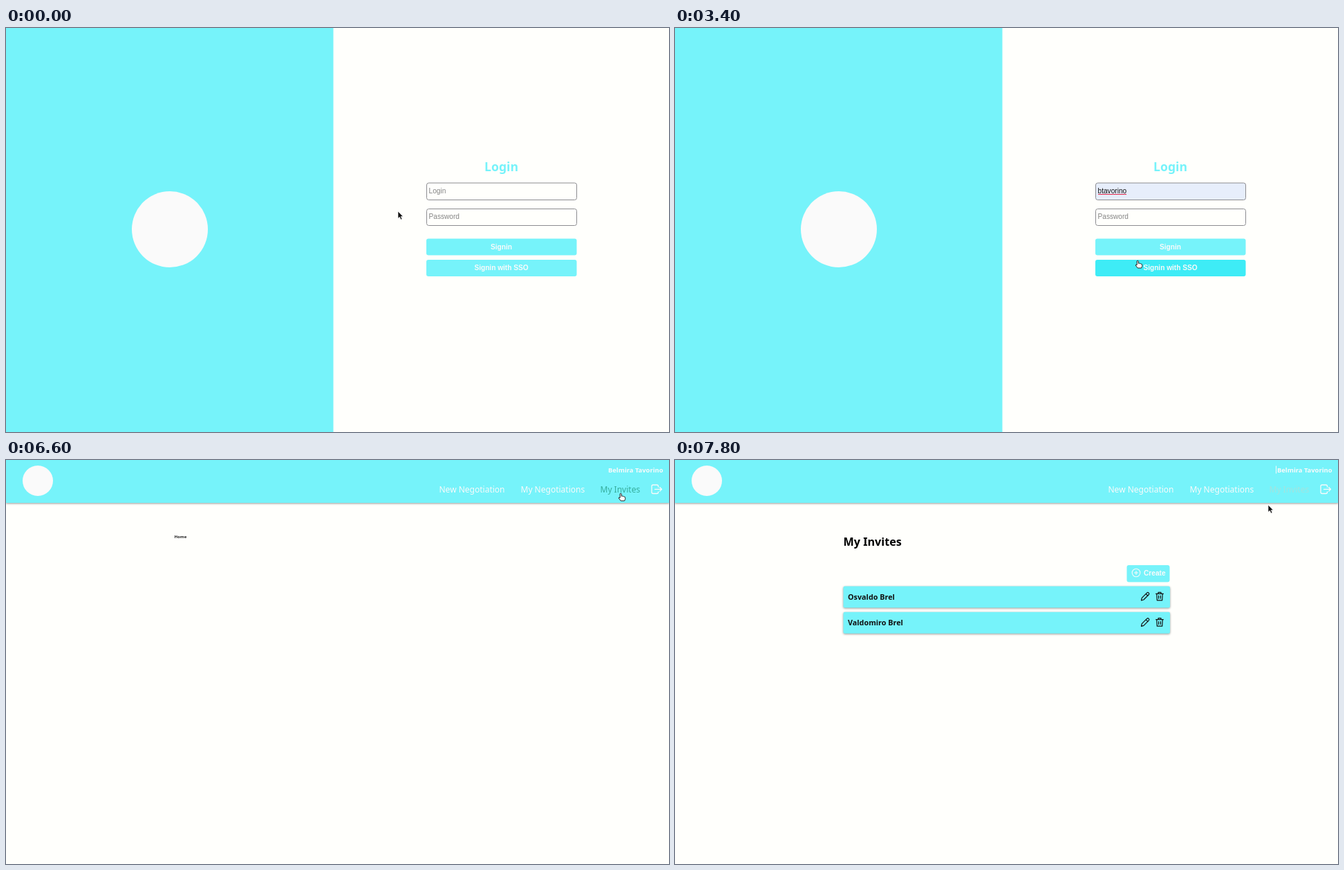
Write an HTML page that moves like this. It is 959 by 584 pixels and loops after 8000 ms.

```html
<!DOCTYPE html>
<html lang="en">
<head>
<meta charset="utf-8">
<title>Login and invites</title>
<style>
  html, body { margin: 0; width: 100%; height: 100%; overflow: hidden; background: #fffffc; }
  svg { display: block; width: 959px; height: 584px; font-family: "Noto Sans", "Open Sans", sans-serif; }
  .cyan { fill: #76f3fa; }
  .pale { fill: #fafafa; }
  .bold { font-weight: 700; }
  .ui { font: 10.13px "Liberation Sans", Arial, sans-serif; }
  .btn { font-weight: 700; fill: #fafafa; }
  .mid { text-anchor: middle; }
  .hint { fill: #858585; }
  .field { fill: #fffffc; stroke: #8c8c90; }
  .line { fill: none; stroke-linecap: round; stroke-linejoin: round; }
  .shade { filter: drop-shadow(0 1px 1.5px rgba(0, 0, 0, .4)); }
  .nav { font-size: 12px; fill: #fafafa; }
  .menu { font-size: 9.8px; font-weight: 600; fill: #222; }
</style>
</head>
<body>
<svg viewBox="0 0 959 584">
  <defs>
    <g id="pencil" class="line" stroke="#111" stroke-width="1.2">
      <path d="M-5.5 5.5l.8-3.6L2.8-5.6q1.2-1 2.4.2t.2 2.4l-7.5 7.5zM1.2-4l2.8 2.8"/>
    </g>
    <g id="trash" class="line" stroke="#111" stroke-width="1.2">
      <path d="M-5.3-3.6H5.3M-2-3.8V-5.6H2v1.8M-4.2-3.4l.5 9.2H3.7l.5-9.2M-1.4-.8v4M1.4-.8v4"/>
    </g>
  </defs>

  <g id="login">
    <rect class="cyan" width="473.5" height="584"/>
    <circle class="pale" cx="237" cy="291" r="55"/>
    <text class="bold cyan mid" x="716.5" y="207" font-size="17.6">Login</text>
    <rect id="user" class="field" x="608.5" y="224" width="217" height="24.5" rx="3"/>
    <text id="userText" class="ui" x="611.5" y="239"></text>
    <path id="spell" d="M612 240.5H653" stroke="#e0284a"/>
    <rect id="caret" y="230" width="1" height="11"/>
    <rect class="field" x="608.5" y="261.5" width="217" height="24" rx="3"/>
    <text class="ui hint" x="611.5" y="276">Password</text>
    <rect id="signin" x="608" y="304.5" width="217.5" height="24" rx="3"/>
    <text class="ui btn mid" x="716.5" y="319.5">Signin</text>
    <rect id="sso" x="608" y="335" width="217.5" height="24" rx="3"/>
    <text class="ui btn mid" x="716.5" y="350">Signin with SSO</text>
    <g id="list">
      <rect class="shade" x="607.5" y="249.5" width="218" height="143.5" rx="2" fill="#fffffc"/>
      <rect id="pick" x="607.5" y="254" width="218" height="22.5" fill="#e5e5e3"/>
      <g id="names" class="menu"></g>
    </g>
  </g>

  <g id="app">
    <rect class="cyan shade" width="959" height="62"/>
    <circle class="pale" cx="46" cy="30" r="22"/>
    <text class="bold pale" x="950.5" y="17.5" font-size="9.4" text-anchor="end">Belmira Tavorino</text>
    <rect id="nameCaret" class="pale" x="869" y="8.5" width="1" height="11"/>
    <g class="nav">
      <text x="626.5" y="47">New Negotiation</text>
      <text x="744.5" y="47">My Negotiations</text>
      <text id="link" x="859.5" y="47">My Invites</text>
    </g>
    <path class="line" stroke="#fafafa" stroke-width="1.3"
      d="M943.5 39V38q0-2-2-2H936q-2 0-2 2v8.500q0 2 2 2h5.500q2 0 2-2V46M938.500 42.300H948.500M945.700 39.500l2.800 2.800l-2.800 2.800"/>
    <text id="home" x="243.500" y="113" font-size="6" font-weight="600" fill="#222">Home</text>
    <g id="status">
      <path d="M0 571H315.500q2.500 0 2.500 2.500V584H0z"/>
      <text x="2" y="581" font-size="9.1" fill="#f4f4f4">Waiting for zunelo-vercel.vercel.app…</text>
    </g>
    <g id="invites">
      <text class="bold" x="243.500" y="124" font-size="16.2">My Invites</text>
      <rect class="cyan" x="653.500" y="152" width="62" height="24.500" rx="3"/>
      <path class="line" stroke="#fafafa" stroke-width="1.100"
        d="M661.200 163a5.800 5.800 0 1 1 11.600 0a5.800 5.800 0 1 1-11.600 0M664.500 163h5M667 160.500v5"/>
      <text class="ui btn" x="678" y="167">Create</text>
    </g>
    <g id="rows"></g>
  </g>

  <g id="busy">
    <rect width="959" height="584" opacity=".31"/>
    <g id="spin">
      <path d="M12 2.600A12.300 12.300 0 1 1 7-10.100" fill="none" stroke="#76f3fa" stroke-width="4.800"/>
      <path class="cyan" d="M10-15V-7H2.500z"/>
    </g>
  </g>

  <g id="cursor">
    <path id="arrow" d="M0 0V10.300L2.400 8.200L4.100 12L5.900 11.200L4.300 7.500H7.300z"
      fill="#111" stroke="#fff" stroke-width=".6"/>
    <path id="beam" class="line" stroke="#555" d="M-1.800-4.500H1.800M0-4.500V4.500M-1.800 4.500H1.800"/>
    <path id="hand" fill="#fff" stroke="#222" stroke-width="1" stroke-linejoin="round"
      d="M-.8.800Q.3-.5 1.300.900V4.300Q2.500 3.500 3.300 4.600Q4.500 4 5.100 5.200Q6.700 4.900 6.700 6.500V8.500L5.600 11H.3L-2.800 7Q-2.500 5.400-.8 6.600z"/>
  </g>
</svg>
<script>
const $ = id => document.getElementById(id);
const show = (id, on) => $(id).style.display = on ? "" : "none";
const fill = (id, color) => $(id).style.fill = color;
const within = (t, ...spans) => spans.some(([a, b]) => t >= a && t < b);

const logins = ["btavorino", "tmosu", "obrel", "osvaldo.campelim.brel2", "gkjhg", "10203040506"];
$("names").innerHTML = logins.map((name, i) =>
  `<text x="614.5" y="${269 + i * 22.4}">${name}</text>`).join("");

$("rows").innerHTML = ["Osvaldo Brel", "Valdomiro Brel"].map((name, i) =>
  `<g transform="translate(0 ${i * 37.3})">
    <rect class="cyan shade" x="243.5" y="182.5" width="472.5" height="31" rx="2"/>
    <text class="bold" x="250" y="202" font-size="10.8" fill="#111">${name}</text>
    <use href="#pencil" x="680" y="197.500"/><use href="#trash" x="701" y="197"/>
  </g>`).join("");

// time, x, y of the pointer's hot spot
const path = [
  [0, 567, 265], [200, 595, 254], [400, 634, 240], [600, 642, 238], [2000, 642, 238],
  [2400, 649, 258], [2600, 650, 262], [2800, 651, 266], [3200, 664, 316], [3400, 669, 336],
  [3800, 669, 346], [4400, 669, 346], [5600, 845, 115], [6200, 889, 48],
  [7400, 889, 48], [7600, 880, 52], [7800, 858, 65]
];

function pointAt(t) {
  const i = path.findIndex(p => p[0] > t);
  if (i < 0) return path.at(-1).slice(1);
  const [a, b] = [path[i - 1], path[i]];
  const k = (t - a[0]) / (b[0] - a[0]);
  return [1, 2].map(j => a[j] + (b[j] - a[j]) * k);
}

const blink = (t, start) => t >= start && Math.floor((t - start) / 500) % 2 === 0;

function linkColor(t) {
  if (t === 7800) return "#a3e3de";
  if (t === 6200 || t === 7400) return "#9bd5cc";
  return within(t, [6400, 6800], [7600, 7800]) ? "#35ad9c" : "#fafafa";
}

function draw(now) {
  const t = Math.floor(now % 8000 / 200) * 200;   // the screen refreshes five times a second
  const filled = t >= 2400, chosen = t >= 2800, inApp = t >= 4000;

  show("login", !inApp);
  show("app", inApp);
  show("list", within(t, [600, 2800]));
  show("pick", filled);
  show("spell", chosen);
  fill("user", filled ? "#e7eefb" : "#fffffc");
  $("userText").textContent = filled ? logins[0] : "Login";
  fill("userText", filled ? "#111" : "#858585");
  $("caret").setAttribute("x", filled ? 654 : 612);
  show("caret", blink(t, chosen ? 2800 : filled ? 2400 : 600 + 100));
  fill("signin", within(t, [3200, 3400]) ? "#3eecf6" : "#76f3fa");
  fill("sso", t >= 3400 ? "#3eecf6" : "#76f3fa");

  show("nameCaret", blink(t, 3750));
  show("home", t < 6800);
  show("status", t < 5000);
  show("invites", t >= 6800);
  show("rows", t >= 7400);
  fill("link", linkColor(t));
  show("busy", within(t, [6800, 7400]));
  $("spin").setAttribute("transform", `translate(479.5 291.5) rotate(${(t - 6800) * .36})`);

  const beam = within(t, [400, 2800]);
  const hand = within(t, [3200, 4000], [6200, 6800], [7400, 7800]);
  show("beam", beam);
  show("hand", hand);
  show("arrow", !beam && !hand);
  $("cursor").setAttribute("transform", `translate(${pointAt(t)})`);
}

const begin = performance.now();
(function tick() {
  draw(performance.now() - begin);
  requestAnimationFrame(tick);
})();
</script>
</body>
</html>
```
